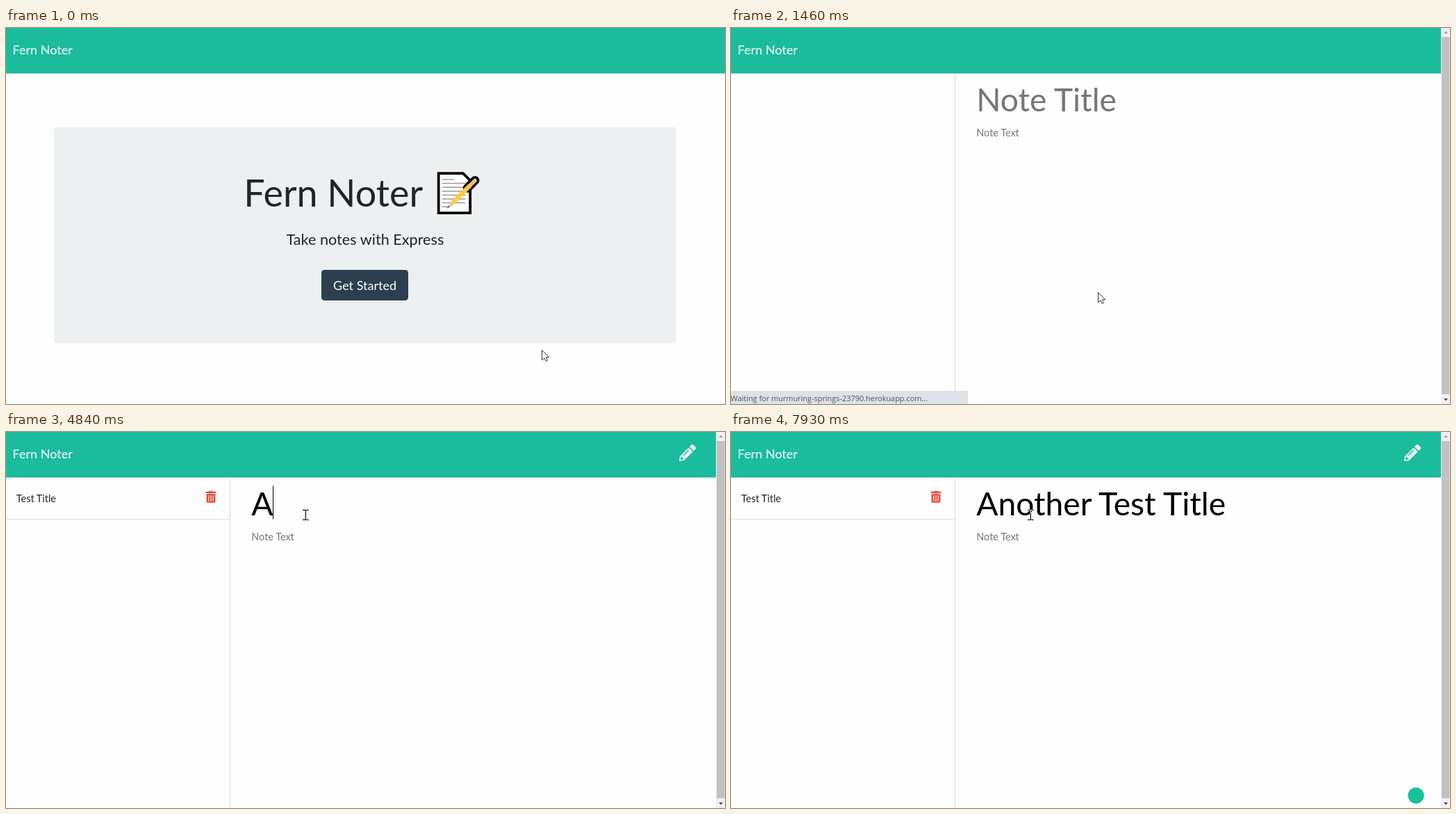
An HTML page that plays this animation: 1035 px wide and 541 px high, repeating every 8 s.

```html
<!DOCTYPE html>
<html lang="en">
<head>
<meta charset="utf-8">
<title>Fern Noter</title>
<style>
  html, body { margin: 0; width: 100%; height: 100%; overflow: hidden; background: #fefefe; }
  svg { display: block; width: 1035px; height: 541px; isolation: isolate; }
  text { font-family: Lato, "Open Sans", sans-serif; font-size: 14.43px; white-space: pre; }
  .brand, .action { font-size: 18.04px; fill: #fff; }
  .heading { font-size: 53.9px; }
  .lead { font-size: 21.65px; }
  .title { font-size: 46.2px; }
  .dark { fill: #212529; }
  .hint { fill: #757575; }
  .mid { text-anchor: middle; }
  #status text { font-family: "Open Sans", "Noto Sans", sans-serif; font-size: 10.91px; fill: #505458; }
  #beam { fill: none; stroke: #fff; stroke-width: 1.2; mix-blend-mode: difference; }
  #click { fill: #ff0; opacity: .68; mix-blend-mode: multiply; }
</style>
</head>
<body>
<svg viewBox="0 0 1035 541" xmlns="http://www.w3.org/2000/svg">
  <rect width="1035" height="541" fill="#fefefe"/>
  <rect width="1035" height="65.5" fill="#1abc9c"/>
  <text class="brand" x="9.6" y="38.2">Fern Noter</text>

  <g id="landing">
    <rect x="69.3" y="142.4" width="895.2" height="311.2" rx="4.6" fill="#ecf0f1"/>
    <text class="heading dark" x="342.3" y="257">Fern Noter</text>
    <g id="memo">
      <path d="M622.7 209.2H658L668.2 219.5V266.2H622.7Z" fill="#fff" stroke="#000" stroke-width="3.8"/>
      <path id="rules" stroke="#9a9a9a" stroke-width="1.5"/>
      <g fill="none" stroke-linecap="round">
        <path d="M664 230.5L675.2 219.2" stroke="#000" stroke-width="12.5"/>
        <path d="M668 226.4L675 219.4" stroke="#e3bd94" stroke-width="5.6"/>
        <path d="M642.5 251.9L668 226.4" stroke="#fccb3e" stroke-width="6.4" stroke-linecap="butt"/>
      </g>
      <path d="M640.2 249.6L644.8 254.2L635 259.4Z" fill="#e8c9a8"/>
      <path d="M636.8 256L638.4 257.6L634.6 259.8Z" fill="#444"/>
    </g>
    <text class="lead dark mid" x="516.9" y="312">Take notes with Express</text>
    <rect id="ring" x="452.5" y="346.5" width="128" height="47" rx="6" fill="none" stroke="#4c5b6a" stroke-opacity=".6" stroke-width="3"/>
    <rect id="button" x="454" y="348" width="125" height="44" rx="4.6"/>
    <text class="action mid" x="516.6" y="376.5">Get Started</text>
  </g>

  <g id="notes">
    <path d="M322.5 65.5V541" stroke="#d8d9da"/>
    <g id="entry">
      <path d="M0 125.5H322" stroke="#e0e1e2"/>
      <text class="dark" x="14.8" y="100.6">Test Title</text>
      <path transform="translate(287.5 84.7) scale(.0335)" fill="#e74c3c" fill-rule="evenodd"
        d="M32 128H416V464a48 48 0 0 1-48 48H80a48 48 0 0 1-48-48ZM112 192h32v256h-32ZM208 192h32v256h-32ZM304 192h32v256h-32ZM16 32H136L150 8Q156 0 167 0H281Q292 0 298 8L312 32H432a16 16 0 0 1 16 16V80a16 16 0 0 1-16 16H16A16 16 0 0 1 0 80V48a16 16 0 0 1 16-16Z"/>
    </g>
    <path id="pencil" transform="translate(969 18) scale(.0469)" fill="#ecf0f1" fill-rule="evenodd"
      d="M498 142l-46 46q-9 8-17 0l-111-111q-8-9 0-17l46-46c19-19 49-19 68 0l60 60c19 19 19 49 0 68ZM284 100L22 362L0 484c-3 16 11 31 28 28l122-22L412 228q8-9 0-17L301 100q-9-8-17 0ZM124 340q-8-10 0-20l154-154q10-8 20 0q8 10 0 20l-154 154q-10 8-20 0ZM88 424h48v36l-64 12l-32-32L52 376H88Z"/>
    <text id="hint" class="title hint" x="353.3" y="120.4">Note Title</text>
    <text id="typed" class="title" x="353.3" y="120.4" xml:space="preserve"></text>
    <text class="hint" x="353.3" y="156.3">Note Text</text>
    <rect id="caret"/>
    <rect x="1022" width="13" height="541" fill="#f1f1f1"/>
    <rect x="1023" y="13" width="11.5" height="514" fill="#c1c1c1"/>
    <path d="M1026 8h6l-3-3.6Z" fill="#a3a3a3"/>
    <path d="M1026 533h6l-3 3.6Z" fill="#505050"/>
    <circle id="badge" cx="986" cy="523" r="11.6" fill="#15c39a"/>
  </g>

  <g id="status">
    <path d="M0 522H338Q341 522 341 525V541H0Z" fill="#dee1e5"/>
    <text x="-.4" y="537.2"></text>
  </g>

  <g id="pointer">
    <path id="arrow" d="M.5 .5V14.9L3.8 11.7L6.2 16.6L8.7 15.5L6.3 10.8H11Z" fill="#fff" stroke="#333"/>
    <path id="hand" transform="translate(-2.7 0)" fill="#fff" stroke="#222"
      d="M4 11.5V2a1.6 1.6 0 0 1 3.2 0V7.6a1.5 1.5 0 0 1 2.9 .4a1.5 1.5 0 0 1 2.6 .7a1.3 1.3 0 0 1 2.1 1.2V13.5C14.8 16 13.4 17 13.4 19.6H6.4C6.2 17.5 2.5 14.6 .8 11.6C0 10 1.8 9 3 10.3Z"/>
  </g>
  <path id="beam" d="M-4.2-7h3.7M.5-7h3.7M0-6.8V6.8M-4.2 7h3.7M.5 7h3.7"/>
  <circle id="click" r="11.5"/>
</svg>

<script>
const LOOP = 8000;
const PHRASE = "Another Test Title";
const KEYS = [4840, 4990, 5070, 5220, 5300, 5380, 5460, 5690, 5920,
              6090, 6160, 6230, 6380, 6610, 6690, 6860, 7040, 7070];
const HOST = "murmuring-springs-23790.herokuapp.com";
// start, end, number of steps, destination
const MOVES = [
  [80, 850, 11, 528, 380],
  [1870, 2490, 9, 412, 115.5],
  [3360, 3510, 3, 431.3, 119.3]
];

const $ = id => document.getElementById(id);
const show = (id, on) => { $(id).style.display = on ? "" : "none"; };
const within = (t, a, b) => t >= a && t < b;
const ease = p => p * p * (3 - 2 * p);
const place = (id, x, y) => $(id).setAttribute("transform", `translate(${x} ${y})`);

function setBox(id, x, y, width, height) {
  for (const [k, v] of Object.entries({ x, y, width, height })) $(id).setAttribute(k, v);
}

const pen = document.createElement("canvas").getContext("2d");
pen.font = "46.2px Lato, 'Open Sans', sans-serif";

$("rules").setAttribute("d", Array.from({ length: 8 }, (_, i) =>
  `M628 ${218 + i * 5.6}H${i === 0 ? 645 : i === 7 ? 640 : 661.5}`).join(""));

function pointerAt(t) {
  let x = 771, y = 463;
  for (const [from, to, steps, tx, ty] of MOVES) {
    if (t < from) break;
    const step = Math.floor((t - from) / (to - from) * (steps - 1) + 1e-6) + 1;
    const p = ease(Math.min(1, step / steps));
    x += (tx - x) * p;
    y += (ty - y) * p;
  }
  return [x, y];
}

function drawPointer(t) {
  const [x, y] = pointerAt(t);
  const hover = t < 1460 && x > 454 && x < 579 && y > 348 && y < 392;
  const beam = t >= 1550;
  place("pointer", x, y);
  place("beam", x, y);
  show("arrow", !hover && !beam);
  show("hand", hover);
  show("beam", beam);
  $("button").setAttribute("fill", hover ? "#1e2b37" : "#2c3e50");

  const first = within(t, 1000, 1160);
  show("click", first || within(t, 3040, 3360));
  place("click", first ? 528 : 410.5, first ? 380 : 114.5);
}

function drawTitle(t) {
  const text = PHRASE.slice(0, KEYS.filter(k => k <= t).length);
  $("typed").textContent = text;
  show("hint", !text);
  const inTitle = within(t, 3040, 3740) || within(t, 4290, 7380);
  const inBody = within(t, 7380, 7930);
  show("caret", inTitle || inBody);
  if (inBody) setBox("caret", 353, 142, 1.5, 18);
  else setBox("caret", Math.floor(353.4 + pen.measureText(text).width), 77.5, text ? 1 : 2, 48);
}

function draw(t) {
  const notes = t >= 1460;
  show("landing", !notes);
  show("notes", notes);
  show("ring", t >= 920);
  show("pencil", t >= 1550);
  show("entry", t >= 1620);
  show("badge", t >= 7930);
  show("status", within(t, 773, 2025));
  $("status").lastElementChild.textContent =
    t < 1310 ? `https://${HOST}/notes` : `Waiting for ${HOST}...`;
  drawPointer(t);
  drawTitle(t);
}

const start = performance.now();
function tick() {
  draw((performance.now() - start) % LOOP);
  requestAnimationFrame(tick);
}
tick();
</script>
</body>
</html>
```
